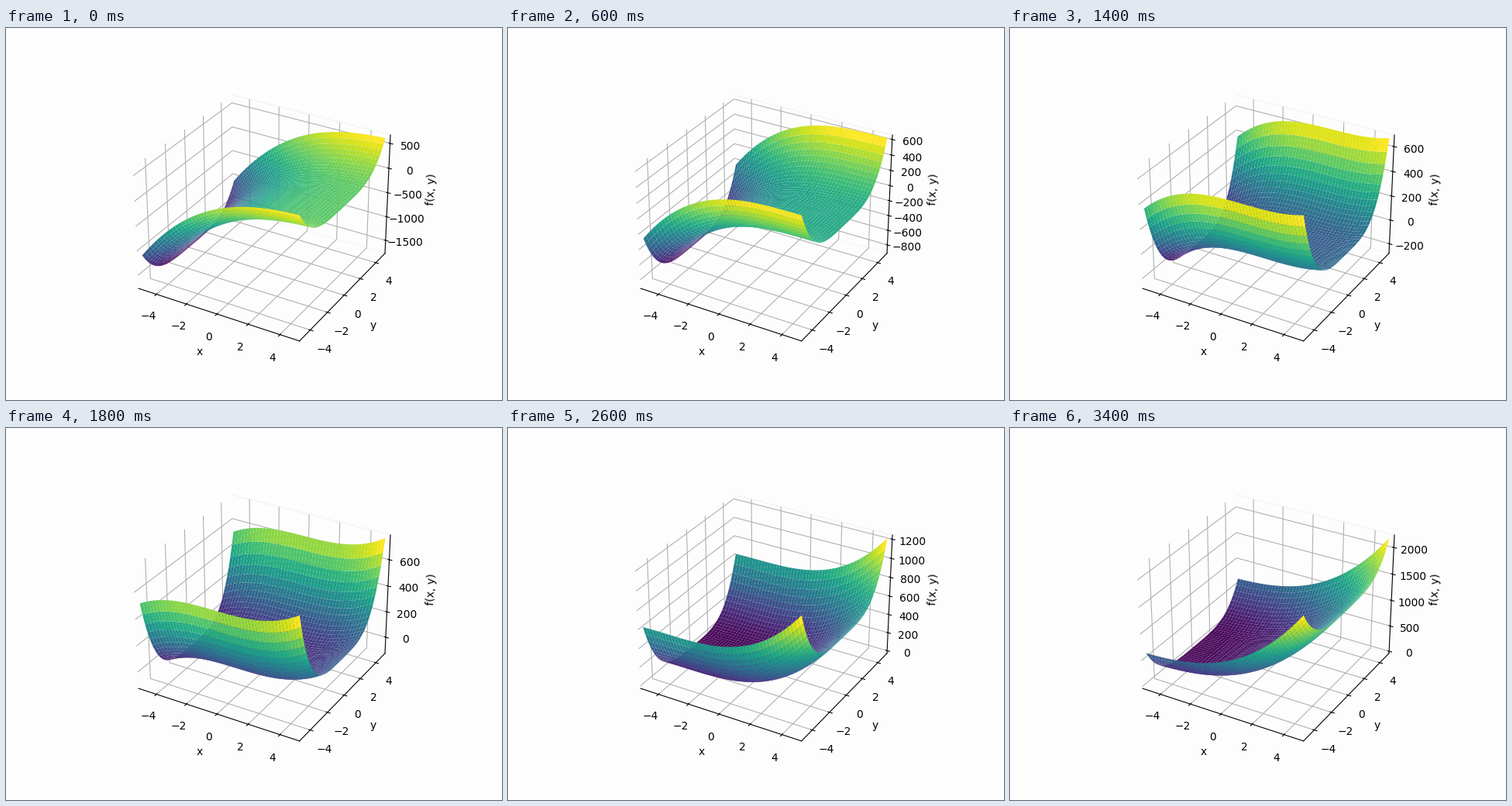
Recreate the animation shown at these times as a matplotlib script. Size 640 by 480 pixels, loop 3500 ms.

```python
import numpy as np
import matplotlib.pyplot as plt
from matplotlib.animation import FuncAnimation

FRAMES = 35
PAD = 1 / 48
PAPER = "#fdfdfd"

axis = np.linspace(-5, 5, 50)
X, Y = np.meshgrid(axis, axis)

fig = plt.figure(figsize=(6.4, 4.8), dpi=100, facecolor=PAPER)
ax = fig.add_subplot(projection="3d", facecolor=PAPER)
ax.set(xlabel="x", ylabel="y", zlabel="f(x, y)")

for a, edge in ((ax.xaxis, PAPER), (ax.yaxis, "0.92"), (ax.zaxis, PAPER)):
    a.pane.set_fill(False)
    a.pane.set_edgecolor(edge)

surface = None


def update(i):
    """Slide the cubic along x while the quartic valley stays put."""
    global surface
    if surface is not None:
        surface.remove()
    shift = -7 + 0.4 * i
    Z = (X + shift) ** 3 + Y ** 4
    surface = ax.plot_surface(X, Y, Z, cmap="viridis")
    ax.set_xlim(-5, 5, view_margin=PAD)
    ax.set_ylim(-5, 5, view_margin=PAD)
    ax.set_zlim(Z.min(), Z.max(), view_margin=PAD)
    return (surface,)


anim = FuncAnimation(fig, update, frames=FRAMES, interval=100,
                     init_func=lambda: update(0), repeat=True, repeat_delay=0)
plt.show()
```
